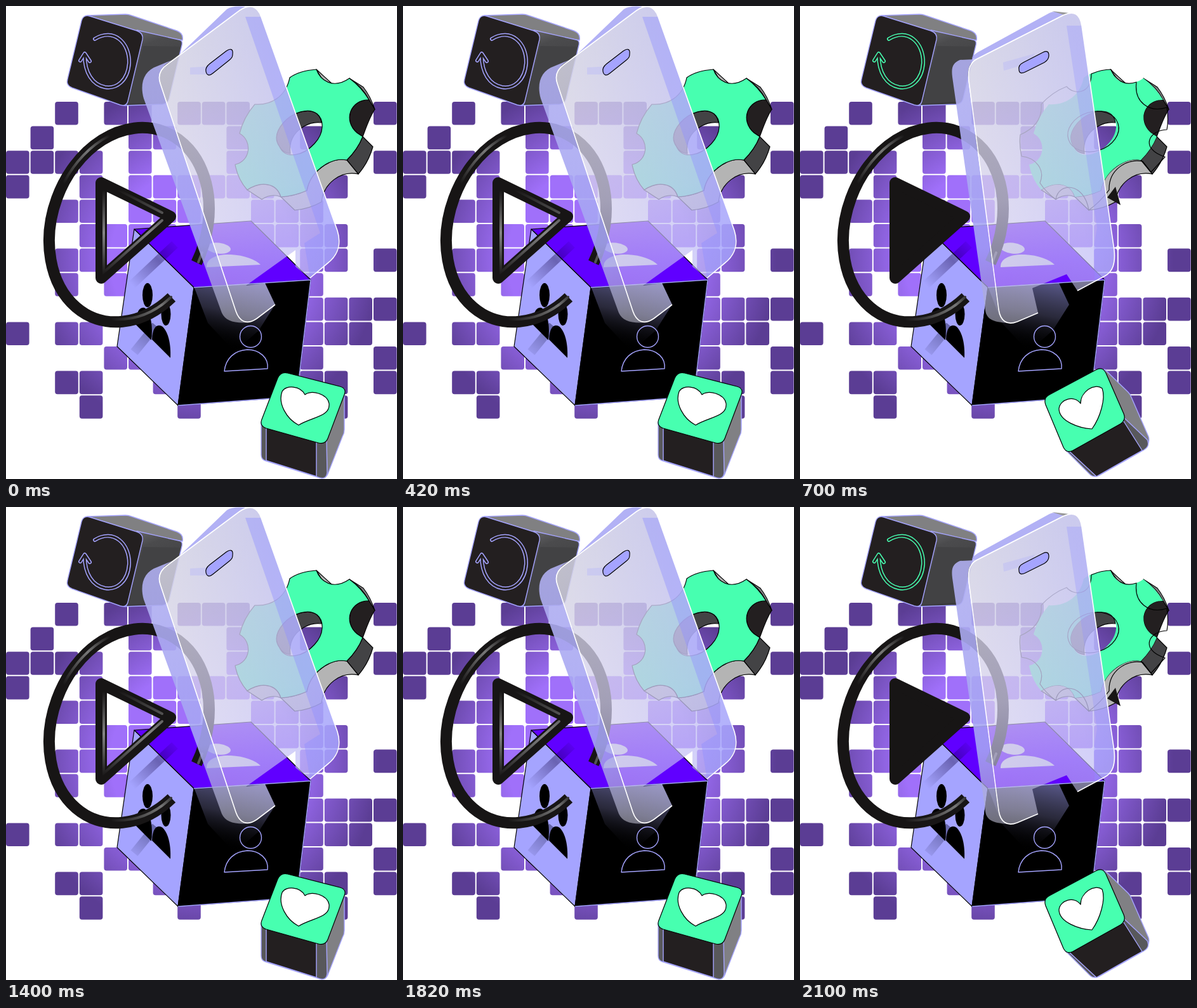
Animation of 616 by 746 pixels, one loop 2800 ms. Source, as an HTML page:

```html
<!DOCTYPE html>
<html lang="en">
<head>
<meta charset="utf-8">
<title>Media blocks</title>
<style>
html, body { margin: 0; width: 100%; height: 100%; overflow: hidden; background: #fff; }
svg { display: block; width: 616px; height: 746px; }
.a, .b { animation: swap 1.4s step-end infinite; }
.b { animation-delay: -.7s; }
@keyframes swap { 0% { visibility: visible; } 50%, 100% { visibility: hidden; } }
.ink { stroke: #000; stroke-width: 1.2; stroke-linejoin: round; }
.lav { stroke: #a5a4ff; stroke-width: 1.4; stroke-linejoin: round; }
.line { fill: none; }
.tube { fill: none; stroke: #171515; stroke-width: 18; stroke-linejoin: round; }
.shine { fill: none; stroke-width: 4; stroke-linecap: round; }
.rim { fill: none; stroke: #fff; stroke-width: 1.6; stroke-linejoin: round; }
</style>
</head>
<body>
<svg viewBox="0 0 616 746">
<defs>
  <radialGradient id="cells" gradientUnits="userSpaceOnUse" cx="310" cy="400" r="290">
    <stop offset=".5" stop-color="#a070fa"/><stop offset=".96" stop-color="#5b3d94"/>
  </radialGradient>
  <linearGradient id="glare" gradientUnits="userSpaceOnUse" x1="365" y1="435" x2="345" y2="540">
    <stop stop-color="#a5a4ff" stop-opacity=".5"/><stop offset=".45" stop-color="#7776a8" stop-opacity=".35"/>
    <stop offset="1" stop-color="#000" stop-opacity="0"/>
  </linearGradient>
  <linearGradient id="glass" gradientUnits="userSpaceOnUse" x1="300" y1="60" x2="390" y2="500">
    <stop stop-color="#d6d5e2" stop-opacity=".86"/><stop offset=".55" stop-color="#d4d0ec" stop-opacity=".74"/>
    <stop offset=".8" stop-color="#cac5f2" stop-opacity=".6"/><stop offset="1" stop-color="#c8c8d8" stop-opacity=".5"/>
  </linearGradient>
  <linearGradient id="tint" gradientUnits="userSpaceOnUse" x1="270" y1="200" x2="460" y2="150">
    <stop stop-color="#a5a4ff" stop-opacity="0"/><stop offset="1" stop-color="#a5a4ff" stop-opacity=".3"/>
  </linearGradient>
  <linearGradient id="edge" gradientUnits="userSpaceOnUse" x1="250" y1="90" x2="350" y2="495">
    <stop stop-color="#b0aff0" stop-opacity=".9"/><stop offset=".7" stop-color="#a5a4f4" stop-opacity=".9"/>
    <stop offset="1" stop-color="#b4b4c4" stop-opacity=".6"/>
  </linearGradient>
  <linearGradient id="gleam" gradientUnits="userSpaceOnUse" x1="154" y1="290" x2="154" y2="425">
    <stop stop-color="#171515"/><stop offset=".5" stop-color="#858585"/><stop offset="1" stop-color="#171515"/>
  </linearGradient>
  <linearGradient id="tail" gradientUnits="userSpaceOnUse" x1="165" y1="495" x2="262" y2="460">
    <stop stop-color="#171515"/><stop offset=".8" stop-color="#777"/><stop offset="1" stop-color="#333"/>
  </linearGradient>
  <linearGradient id="arc" gradientUnits="userSpaceOnUse" x1="90" y1="280" x2="165" y2="205">
    <stop stop-color="#171515"/><stop offset=".6" stop-color="#777"/><stop offset="1" stop-color="#171515"/>
  </linearGradient>
  <linearGradient id="wall" gradientUnits="userSpaceOnUse" x1="200" y1="20" x2="250" y2="160">
    <stop stop-color="#77777a"/><stop offset=".3" stop-color="#4b4b4d"/><stop offset="1" stop-color="#38383a"/>
  </linearGradient>
  <linearGradient id="shadeTop" gradientUnits="userSpaceOnUse" x1="268" y1="374" x2="198" y2="440">
    <stop stop-color="#100040" stop-opacity=".05"/><stop offset=".4" stop-color="#100040" stop-opacity=".4"/>
    <stop offset="1" stop-color="#100040" stop-opacity="0"/>
  </linearGradient>
  <linearGradient id="shadeLow" gradientUnits="userSpaceOnUse" x1="238" y1="502" x2="200" y2="548">
    <stop stop-color="#20204c" stop-opacity=".5"/><stop offset="1" stop-color="#20204c" stop-opacity=".08"/>
  </linearGradient>
  <g id="reload" fill="none" stroke-linecap="round" stroke-linejoin="round">
    <path d="M140 52C170 34 195 58 194 90C192 118 174 131 156 128C136 124 124 105 124 78M117 86L124 75L132 87"/>
  </g>
  <path id="gearFace" fill-rule="evenodd" d="M447 113Q462 102 489 100C495 117 515 132 541 114Q560 128 572 148C543 147 530 180 553 200L562 206Q554 226 537 243C510 238 479 262 474 291Q454 300 433 301C426 278 401 276 380 290Q365 273 361 250C385 245 389 213 368 201Q374 176 392 155C417 157 441 143 447 113ZM431 222C440 242 468 237 486 217C502 200 501 179 490 170C477 160 452 167 437 184C425 198 423 211 431 222Z"/>
  <path id="paneA" d="M424 471L395 493C380 503 368 499 362 481L243 122Q237 104 254 92L368 7C384 -4 396 0 402 17L522 354C528 373 524 390 511 402L479 429"/>
  <path id="paneB" d="M375 484L342 498C326 504 316 497 313 479L266 118C264 98 268 88 282 82L416 14C432 7 441 13 444 31L495 385C497 406 493 419 480 426L437 449"/>
  <path id="glassA" d="M424 471L395 493C380 503 368 499 362 481L243 122Q237 104 254 92L368 7C384 -4 396 0 402 17L522 354C528 373 524 390 511 402L479 429L456 411L456 385L378 441L408 437Z"/>
  <path id="glassB" d="M375 484L342 498C326 504 316 497 313 479L266 118C264 98 268 88 282 82L416 14C432 7 441 13 444 31L495 385C497 406 493 419 480 426L437 449L420 423L366 445Z"/>
</defs>

<g id="grid" fill="url(#cells)"></g>

<!-- reload block -->
<g class="lav">
  <path fill="#808082" d="M128 15L188 13Q193 13 198 15L269 39Q280 43 278 54L215 45Z"/>
  <path fill="url(#wall)" d="M206 38L272 53Q279 54 277 62L257 146Q255 154 247 155L186 157Z"/>
  <path fill="#424244" stroke="none" d="M216 63L274 64L254 150L193 154Z"/>
  <path fill="#231f20" d="M132 16L206 39Q217 43 215 53L192 150Q190 159 180 156L104 129Q94 125 97 115L119 23Q122 13 132 16Z"/>
</g>
<g class="a"><use href="#reload" stroke="#a5a4ff" stroke-width="6"/></g>
<g class="b"><use href="#reload" stroke="#47ffb0" stroke-width="6"/></g>
<use href="#reload" stroke="#231f20" stroke-width="3"/>

<!-- people cube -->
<g class="ink">
  <path fill="#6000ff" d="M202 352L386 339L480 432L296 444Z"/>
  <path fill="#a5a4ff" d="M202 352L296 444L271 630L175 537Z"/>
  <path fill="#000" d="M296 444L480 432L458 616L271 630Z"/>
</g>
<path fill="url(#glare)" d="M297 445L408 437L424 471L398 512L360 545L318 500Z"/>
<path class="lav line" d="M296 444L480 432L458 616L271 630"/>
<g fill="none" stroke-width="14">
  <path stroke="url(#shadeTop)" d="M266 376L198 440"/>
  <path stroke="url(#shadeLow)" d="M236 504L202 546"/>
</g>
<ellipse cx="223" cy="456" rx="8" ry="19"/>
<ellipse cx="252" cy="486" rx="7.5" ry="18"/>
<path d="M204 502C205 483 210 474 218 476C227 480 232 503 229 527Z"/>
<path d="M230 526C231 505 239 500 247 506C256 515 260 534 259 555Z"/>
<g fill="#d8d5e4">
  <ellipse cx="335" cy="382" rx="19" ry="8.5" transform="rotate(6 335 382)"/>
  <path d="M316 412C315 398 332 391 354 392C376 393 393 400 401 408Z"/>
</g>
<g class="lav line">
  <circle cx="385.5" cy="521.5" r="17"/>
  <path d="M344 576C346 556 360 543 380 542C400 542 414 555 412 572Z"/>
</g>

<!-- play ring -->
<path class="tube" d="M260.900 459.600A121.200 156.800 20 0 1 80.100 303.500A121.200 156.800 20 0 1 247.600 197.600A121.200 156.800 20 0 1 300.200 404.900"/>
<path class="shine" stroke="url(#arc)" d="M91 279A121.200 156.800 20 0 1 162 205"/>
<path class="shine" stroke="url(#tail)" d="M168 494C202 496 234 484 260 459"/>
<path class="shine" stroke="#555" d="M309 389L303 404"/>
<g class="a">
  <path class="tube" d="M150 279V429L259 332Z"/>
  <path class="shine" stroke="url(#gleam)" d="M154 293V420L246 338M160 281L246 326"/>
</g>
<g class="b"><path class="tube" style="fill:#171515" d="M150 279V429L259 332Z"/></g>

<!-- gear -->
<g class="ink">
  <path fill="#b4b4b4" d="M489 100L513 122Q504 123 499 117Z"/>
  <path fill="#808082" d="M541 114L563 128Q574 142 581 163L572 148Q562 128 541 114Z"/>
  <path fill="#231f20" d="M572 148L581 163C573 175 568 190 562 206L553 200C530 180 543 147 572 148Z"/>
  <path fill="#434345" d="M562 206L578 222Q571 247 555 265L537 243Q554 226 562 206Z"/>
  <path fill="#b4b4b4" d="M537 243L555 265C527 259 500 280 497 309Q478 320 455 322L433 301Q454 300 474 291C479 262 510 238 537 243Z"/>
  <path fill="#b4b4b4" d="M380 290C401 276 426 278 433 301Q418 295 403 305Z"/>
  <path fill="#434345" d="M431 222C423 211 425 198 437 184C452 167 477 160 490 170Q496 176 497 184C478 181 458 194 451 209Q446 219 448 233Q437 232 431 222Z"/>
</g>
<use class="a ink" href="#gearFace" fill="#47ffb0"/>
<g class="b">
  <use href="#gearFace" fill="#47ffb0"/>
  <path fill="#171515" d="M484 302L497 285L505 314Z"/>
  <path class="ink line" d="M380 155Q397 136 420 127C432 141 459 139 459 107Q475 100 490 100C499 119 512 126 530 120C526 151 549 169 578 160Q581 180 578 195C549 196 535 225 575 238L553 262L540 245C515 240 486 258 487 290Q473 309 455 322C448 278 407 277 403 305Q387 293 378 279C387 258 371 239 349 237Q345 218 347 203C370 193 382 178 380 155Z"/>
  <ellipse class="ink line" cx="462" cy="198" rx="41" ry="31" transform="rotate(-18 462 198)"/>
</g>

<!-- phone -->
<g class="a">
  <path fill="url(#edge)" d="M243 120L362 480Q370 499 384 499C360 501 346 497 340 484L217 146C210 121 218 102 238 95L267 83Q238 95 243 120Z"/>
  <path fill="#a5a4f4" fill-opacity=".85" d="M254 92L267 83L348 5Q357 -1 377 1L368 7Z"/>
  <use href="#glassA" fill="url(#glass)"/>
  <use href="#glassA" fill="url(#tint)"/>
  <path fill="#8f90ff" fill-opacity=".42" d="M377 17L402 17L522 354Q528 380 512 401L479 429L470 374L495 358Z"/>
  <use class="rim" href="#paneA"/>
  <path fill="#a5a4ff" fill-opacity=".25" d="M290 97L324 95L316 108L290 108Z"/>
  <path class="ink" fill="#a5a4ff" d="M315 103C314 98 316 95 321 91L347 71C354 66 358 68 357 76C357 80 356 82 351 86L326 106C320 111 316 109 315 103Z"/>
</g>
<g class="b">
  <path fill="url(#edge)" d="M265 115L312 478Q316 497 330 500C306 499 294 495 292 480L240 112C238 96 241 90 252 85L276 84Q263 92 265 115Z"/>
  <path fill="#a5a4f4" fill-opacity=".85" d="M276 84Q265 83 280 73L393 11Q402 6 416 13Z"/>
  <path fill="#999" d="M397 8L424 11L416 14Z"/>
  <use href="#glassB" fill="url(#glass)"/>
  <use href="#glassB" fill="url(#tint)"/>
  <path fill="#8f90ff" fill-opacity=".3" d="M420 31L444 31L495 385Q497 414 480 426L464 434L463 380L468 350Z"/>
  <use class="rim" href="#paneB"/>
  <path fill="#a5a4ff" fill-opacity=".25" d="M320 89L370 75L362 90L321 102Z"/>
  <path class="ink" fill="#a5a4ff" d="M345 100C344 95 346 92 352 89L383 73C389 70 392 72 392 78C392 83 390 86 385 89L355 104C349 107 345 106 345 100Z"/>
</g>

<!-- heart block -->
<g class="a">
  <g class="lav">
    <path fill="#808084" d="M533 604L533 668Q533 674 530 679L507 738Q504 745 497 745L494 688Z"/>
    <path fill="#58585b" d="M402 656L505 684L506 736Q505 747 494 744L408 717Q402 715 402 708Z"/>
    <path fill="#231f20" d="M410 660H489V742L410 717Z"/>
  </g>
  <path class="ink" fill="#47ffb0" d="M444 579L526 600Q537 603 533 613L507 682Q503 692 492 689L410 666Q399 662 403 652L428 587Q433 576 444 579Z"/>
  <path class="ink" fill="#fff" d="M461 661C442 651 428 627 435 608C441 597 464 599 471 613C480 605 506 611 509 627C511 648 482 648 461 661Z"/>
</g>
<g class="b">
  <g class="lav">
    <path fill="#808084" d="M480 573L517 609Q520 612 522 617L549 679Q551 685 548 691L505 655Z"/>
    <path fill="#58585b" d="M418 700L509 648L547 684Q552 694 542 700L472 740Q463 745 456 738Z"/>
    <path fill="#231f20" d="M424 702L510 655L539 701L467 742Z"/>
  </g>
  <path class="ink" fill="#47ffb0" d="M393 613L466 574Q477 568 482 579L510 643Q514 653 505 659L430 701Q420 706 415 696L387 629Q383 618 393 613Z"/>
  <path class="ink" fill="#fff" d="M460 667C440 666 408 655 408 635C410 620 432 613 442 627C442 608 464 594 476 603C482 619 473 649 460 667Z"/>
</g>
</svg>
<script>
const rows = [
  [2, 4, 5, 7, 8, 9, 15], [1, 5, 6, 9, 12], [0, 1, 2, 3, 5, 9, 15],
  [0, 3, 5, 6, 7, 8, 9, 10, 13], [2, 3, 5, 6, 7, 10, 11, 12],
  [3, 4, 5, 6, 10, 11, 12, 13], [2, 3, 4, 12, 13, 15], [2, 4, 12],
  [12, 13, 14, 15], [0, 2, 3, 12, 13, 14], [4, 5, 12, 15], [2, 3, 6, 12, 13, 15], [3, 7, 13]
];
const pitch = 38.6;
document.getElementById('grid').innerHTML = rows.map((cols, y) => cols.map(x =>
  `<rect x="${x * pitch}" y="${151 + y * pitch}" width="36.6" height="36.6" rx="4"/>`).join('')).join('');
</script>
</body>
</html>
```
